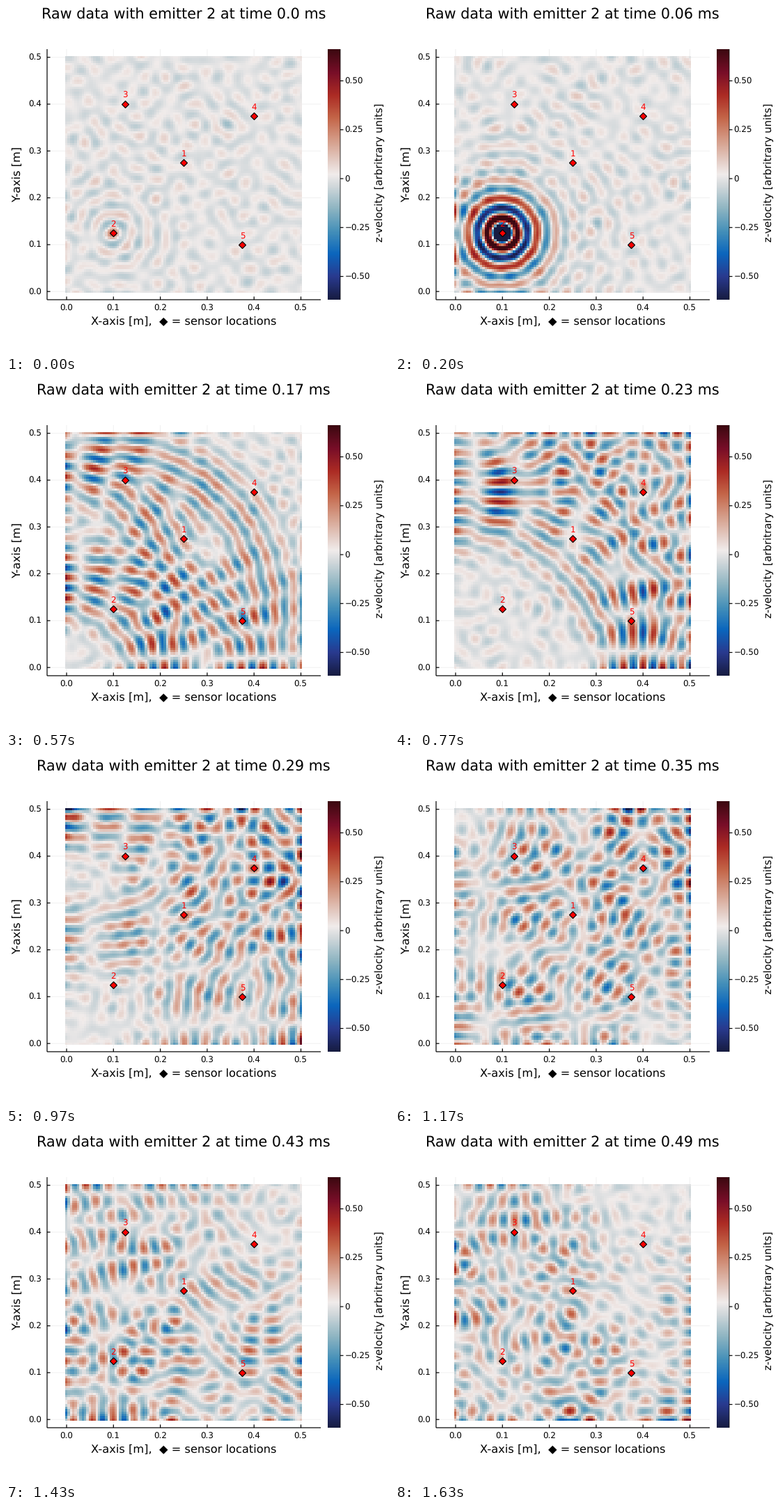
A matplotlib script for the animation above (1.66 s loop, 550 by 500 pixels).

```python
import numpy as np
import matplotlib.pyplot as plt
from matplotlib.animation import FuncAnimation
from matplotlib.colors import LinearSegmentedColormap

plt.rcParams["font.family"] = "DejaVu Sans"
plt.rcParams["text.hinting"] = "no_hinting"

W, H, DPI = 550, 500, 100
STEPS = 50                        # pictures per loop, 0.01 ms apart
TICKS, TICK_MS = 166, 10          # 1660 ms

# ---- bending waves in a thick square plate with free edges ----
SIDE, THICK, NU = 0.5, 0.0095, 0.33
C_PLATE, C_SHEAR2 = 5394.0, 0.86 * 3122.0**2
EMITTER = (0.1, 0.125)
W0, PHASE = 2 * np.pi * 40e3, 1.5
T0, SIGMA = 48e-6, 20e-6
DECAY = 0.9e-3
CELLS, DT = 200, 0.25e-6
VMIN, VMAX = -0.619, 0.662


def bell(x, mid, width):
    return np.exp(-((x - mid) / width) ** 2 / 2)


def drive(s):
    """Main burst plus a weak, slightly higher pitched precursor."""
    return (bell(s, T0, SIGMA) * np.cos(W0 * s + PHASE)
            + 0.12 * bell(s, 0, 40e-6) * np.cos(1.25 * W0 * s))


def spread(q, axis):
    """Divergence from cell centres to nodes, with nothing outside the edge."""
    pad = [(0, 0), (0, 0)]
    pad[axis] = (1, 1)
    d = np.diff(np.pad(q, pad), axis=axis)
    rim = d if axis == 0 else d.T
    rim[0] *= 2
    rim[-1] *= 2
    return d


def simulate():
    n = CELLS
    dx = SIDE / n
    node = np.linspace(0, SIDE, n + 1)
    push = np.outer(bell(node, EMITTER[1], 5e-3), bell(node, EMITTER[0], 5e-3))
    w, mx, my, ex, ey = (np.zeros((n + 1, n + 1)) for _ in range(5))
    tx, qx = np.zeros((n + 1, n)), np.zeros((n + 1, n))
    ty, qy = np.zeros((n, n + 1)), np.zeros((n, n + 1))
    mxy = np.zeros((n, n))
    r = DT / dx
    shear, bend = C_SHEAR2, C_PLATE**2
    stiff = 12 / THICK**2 * DT
    per = round(1e-5 / DT)
    shots = []
    for m in range(-10 * per, (STEPS - 1) * per + 1):
        w += r * (spread(qx, 1) + spread(qy, 0)) + drive(m * DT) * push
        tx += r * (np.diff(mx, axis=1) + spread(mxy, 0)) - stiff * qx
        ty += r * (np.diff(my, axis=0) + spread(mxy, 1)) - stiff * qy
        qx += shear * (r * np.diff(w, axis=1) + DT * tx)
        qy += shear * (r * np.diff(w, axis=0) + DT * ty)
        ex[:, 1:-1] = np.diff(tx, axis=1)
        ey[1:-1] = np.diff(ty, axis=0)
        # no bending moment across a free edge
        ex[1:-1, ::n] = -NU * ey[1:-1, ::n]
        ey[::n, 1:-1] = -NU * ex[::n, 1:-1]
        mx += bend * r * (ex + NU * ey)
        my += bend * r * (ey + NU * ex)
        mxy += bend * r * (1 - NU) / 2 * (np.diff(tx, axis=0) + np.diff(ty, axis=1))
        if m >= 0 and m % per == 0:
            shots.append(w[::2, ::2].copy())
    t = np.arange(STEPS) * 1e-5
    return np.array(shots) * np.exp(-t / DECAY)[:, None, None]


def background(count=150):
    """Faint drifting noise: random plane waves of similar wavelength."""
    rng = np.random.default_rng(7)
    k = rng.normal(160, 22, count)
    angle, start = rng.uniform(0, 2 * np.pi, (2, count))
    p = np.linspace(0, SIDE, 101)[:, None]
    t = np.arange(STEPS)[:, None] * 1e-5
    in_x = np.exp(1j * p * k * np.cos(angle))
    in_y = np.exp(1j * p * k * np.sin(angle))
    in_t = np.exp(1j * (start - t * (W0 + 2700 * (k - 148.5))))
    return ((in_t[:, None] * in_y[None]) @ in_x.T).real


wave, noise = simulate(), background()
field = 0.115 * wave / wave[20:].std() + 0.028 * noise / noise.std()

# ---- drawing, in pixel coordinates ----
tones = [(23, 28, 66), (41, 58, 143), (11, 102, 189), (69, 144, 185),
         (142, 181, 194), (210, 216, 219), (241, 236, 235), (230, 210, 204),
         (213, 157, 137), (196, 101, 72), (172, 43, 36), (120, 14, 40),
         (60, 9, 17)]
stops = [n / 11 for n in range(6)] + [0.5] + [n / 11 for n in range(6, 12)]
balance = LinearSegmentedColormap.from_list(
    "balance", [(p, np.array(c) / 255) for p, c in zip(stops, tones)], N=512)

LEFT, RIGHT, TOP, BOTTOM = 59, 452, 62, 422
SCALE, X0, Y0 = 673.0, 87.0, 410.2


def px(x):
    return X0 + SCALE * x


def py(y):
    return Y0 - SCALE * y


fig = plt.figure(figsize=(W / DPI, H / DPI), dpi=DPI, facecolor="white")
ax = fig.add_axes([0, 0, 1, 1])
ax.axis("off")


def line(xs, ys, width=1.2, **kw):
    ax.plot(xs, ys, color="black", lw=width * 0.72, snap=False,
            solid_capstyle="butt", **kw)


def label(x, y, text, size, ha="center", **kw):
    return ax.text(x, y, text, fontsize=size * 0.72, ha=ha, va="baseline", **kw)


for n in range(6):
    v = n / 10
    line([px(v)] * 2, [TOP, BOTTOM], 1, alpha=0.06, zorder=0)
    line([LEFT, RIGHT], [py(v)] * 2, 1, alpha=0.06, zorder=0)
    line([px(v)] * 2, [BOTTOM, BOTTOM - 4.5])
    line([LEFT, LEFT + 4.5], [py(v)] * 2)
    label(px(v) - 0.4, 437.8, f"{v:.1f}", 11.85)
    label(51, py(v) + 4.3, f"{v:.1f}", 11.85, ha="right")
line([LEFT, LEFT], [TOP, BOTTOM])
line([LEFT, RIGHT], [BOTTOM, BOTTOM])

half = SIDE / 200
heat = ax.imshow(field[0], cmap=balance, vmin=VMIN, vmax=VMAX, origin="lower",
                 extent=(px(-half), px(SIDE + half), py(-half), py(SIDE + half)),
                 interpolation="nearest", aspect="auto", zorder=1)

ax.imshow(np.linspace(0, 1, 360)[:, None], cmap=balance, origin="lower",
          extent=(462, 480, BOTTOM, TOP), interpolation="nearest",
          aspect="auto", zorder=1)
line([480, 480], [TOP, BOTTOM], 0.8)
for v, name in ((0.5, "0.50"), (0.25, "0.25"), (0, "0"),
                (-0.25, "\u22120.25"), (-0.5, "\u22120.50")):
    y = BOTTOM - (v - VMIN) / (VMAX - VMIN) * (BOTTOM - TOP)
    line([480, 484.5], [y, y])
    label(486.5, y + 4.3, name, 11.85, ha="left")

sensors = [(0.25, 0.275), (0.1, 0.125), (0.125, 0.4), (0.4, 0.375), (0.375, 0.1)]
for n, (x, y) in enumerate(sensors, 1):
    ax.plot(px(x), py(y), "D", ms=5.2, mfc="red", mec="black", mew=0.85, zorder=4)
    label(px(x), py(y) - 9.3, str(n), 11.85, color="red", zorder=5)

label(255, 458, "X-axis [m],  \u25c6 = sensor locations", 16.3)
label(21, 241.5, "Y-axis [m]", 16.3, rotation=90, rotation_mode="anchor")
label(540.5, 239.5, "z-velocity [arbritrary units]", 14.85,
      rotation=90, rotation_mode="anchor")
title = label(255, 18.5, "", 20.75)

ax.set_xlim(0, W)
ax.set_ylim(H, 0)


def update(tick):
    step = (3 * tick + 1) // 10
    heat.set_data(field[step])
    title.set_text(f"Raw data with emitter 2 at time {step / 100} ms")
    return heat, title


anim = FuncAnimation(fig, update, frames=TICKS, interval=TICK_MS,
                     init_func=lambda: update(0), repeat=True,
                     repeat_delay=0, blit=False)
plt.show()
```
